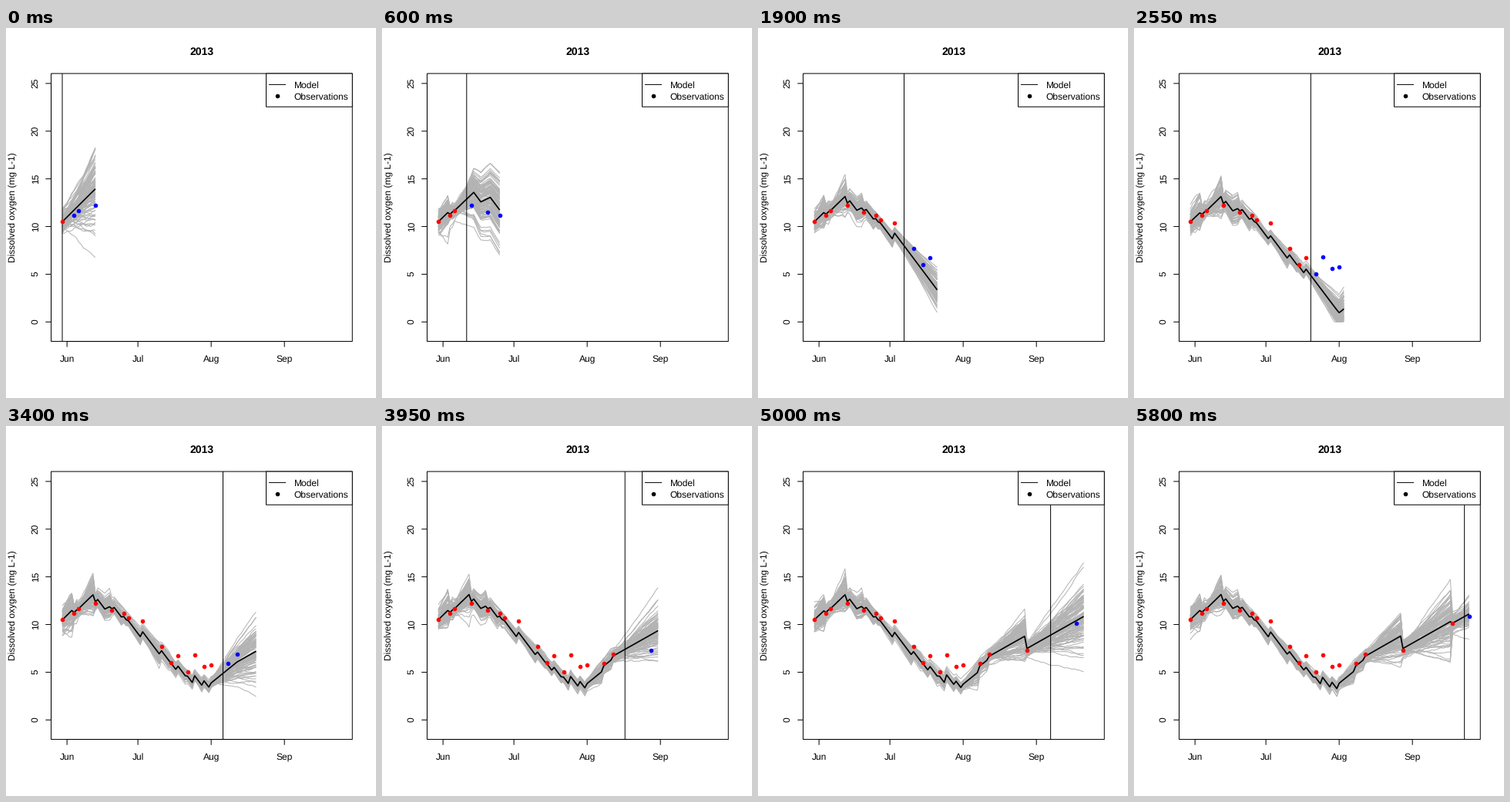
These frames come from a looping animation (480x480 px, 5850 ms). A matplotlib script:

```python
import numpy as np
import matplotlib.pyplot as plt
from matplotlib.animation import FuncAnimation
from matplotlib.collections import LineCollection
from matplotlib.patches import Rectangle

plt.rcParams.update({"font.family": "Liberation Sans", "path.snap": False,
                     "text.hinting": "none", "text.hinting_factor": 1})

SIZE, DPI = 480, 72
LEFT, RIGHT, TOP, BOTTOM = 59.04, 449.76, 59.04, 406.56
LAST, HORIZON, MEMBERS = 118, 14, 100
FRAMES = 117
OBS_VAR = 0.2

OBS = {0: 10.5, 5: 11.2, 7: 11.64, 14: 12.25, 21: 11.52, 26: 11.2, 28: 10.73,
       34: 10.37, 42: 7.72, 46: 6.0, 49: 6.74, 53: 5.07, 56: 6.78, 60: 5.62,
       63: 5.8, 70: 5.9, 74: 6.9, 90: 7.32, 111: 10.12, 118: 10.88}

# Last day of each season, daily drift of oxygen, daily growth of the spread
SEASONS = [(15, 0.24, 0.15), (18, -0.33, 0.08), (22, 0.12, 0.06),
           (63, -0.33, 0.045), (74, 0.2, 0.075), (LAST, 0.14, 0.075)]


def px(day):
    return LEFT + (RIGHT - LEFT) * (0.04 + day / LAST) / 1.08


def py(value):
    return BOTTOM - (value + 2.04) * (BOTTOM - TOP) / 28.08


def ensemble(now):
    """Ensemble Kalman filter up to the current day, then a free forecast."""
    rng = np.random.default_rng(100 + now)

    def draw():
        z = rng.normal(size=MEMBERS)
        return z - 0.8 * z.mean()

    state, slope = OBS[0] + 0.6 * draw(), draw()
    rows = [state]
    for day in range(1, min(now + HORIZON, LAST) + 1):
        drift, rate = next(s[1:] for s in SEASONS if day <= s[0])
        state = state + drift + rate * (slope + 0.7 * draw())
        if day in OBS and day <= now:
            mean, var = state.mean(), state.var()
            gain = var / (var + OBS_VAR)
            state = mean + gain * (OBS[day] - mean) + np.sqrt(1 - gain) * (state - mean)
            slope = draw()
        state = np.maximum(state, 0)
        rows.append(state)
    return np.array(rows)


fig = plt.figure(figsize=(SIZE / DPI, SIZE / DPI), dpi=DPI, facecolor="white")
ax = fig.add_axes([0, 0, 1, 1])
ax.set(xlim=(0.5, SIZE + 0.5), ylim=(SIZE, 0))
ax.axis("off")


def line(xs, ys, z=5, width=1.0):
    return ax.plot(xs, ys, color="black", lw=width, zorder=z,
                   solid_joinstyle="round", solid_capstyle="butt")[0]


def dots(color, z=6):
    return ax.plot([], [], "o", color=color, ms=5.6, mew=0, zorder=z)[0]


def label(x, y, s, **kw):
    opts = dict(fontsize=12, ha="center", va="baseline", rotation_mode="anchor", zorder=9)
    ax.text(x, y, s, **{**opts, **kw})


def box(x, y, w, h, fill, z):
    ax.add_patch(Rectangle((x, y), w, h, fc=fill, ec="black", lw=1, zorder=z))


# Frame, axes and titles
box(LEFT, TOP, RIGHT - LEFT, BOTTOM - TOP, "none", 5)
line([px(2), px(94)], [BOTTOM, BOTTOM])
for day, month in [(2, "Jun"), (32, "Jul"), (63, "Aug"), (94, "Sep")]:
    line([px(day)] * 2, [BOTTOM, BOTTOM + 7.2])
    label(px(day), 433, month)
line([LEFT, LEFT], [py(0), py(25)])
for v in range(0, 26, 5):
    line([LEFT - 7.2, LEFT], [py(v)] * 2)
    label(42, py(v) - 0.5, str(v), rotation=90)
label((LEFT + RIGHT) / 2, 35, "2013", fontsize=14.4, weight="bold")
label(13, (TOP + BOTTOM) / 2 - 0.5, "Dissolved oxygen (mg L-1)", rotation=90)

# Legend
box(338, TOP, RIGHT - 338, 43.2, "white", 7)
line([341.5, 363.5], [73.4, 73.4], z=8)
dots("black", 8).set_data([352.2], [87.8])
label(373.5, 78, "Model", ha="left")
label(373.5, 92.6, "Observations", ha="left")

# Moving parts
cloud = LineCollection([], colors="#b3b3b3", linewidths=1, joinstyle="round", zorder=2)
ax.add_collection(cloud, autolim=False)
mean_line = line([], [], 3, 1.7)
now_line = line([], [], 4)
past, future = dots("red"), dots("blue")


def show(marks, days):
    marks.set_data([px(d) for d in days], [py(OBS[d]) for d in days])


def update(now):
    runs = ensemble(now)
    xs = px(np.arange(len(runs)))
    cloud.set_segments([np.column_stack([xs, py(run)]) for run in runs.T])
    mean_line.set_data(xs, py(runs.mean(axis=1)))
    now_line.set_data([px(now)] * 2, [TOP, BOTTOM])
    show(past, [d for d in OBS if d <= now])
    show(future, [d for d in OBS if now < d <= now + HORIZON])
    return cloud, mean_line, now_line, past, future


anim = FuncAnimation(fig, update, frames=FRAMES, interval=50, repeat=True, repeat_delay=0)
plt.show()
```
